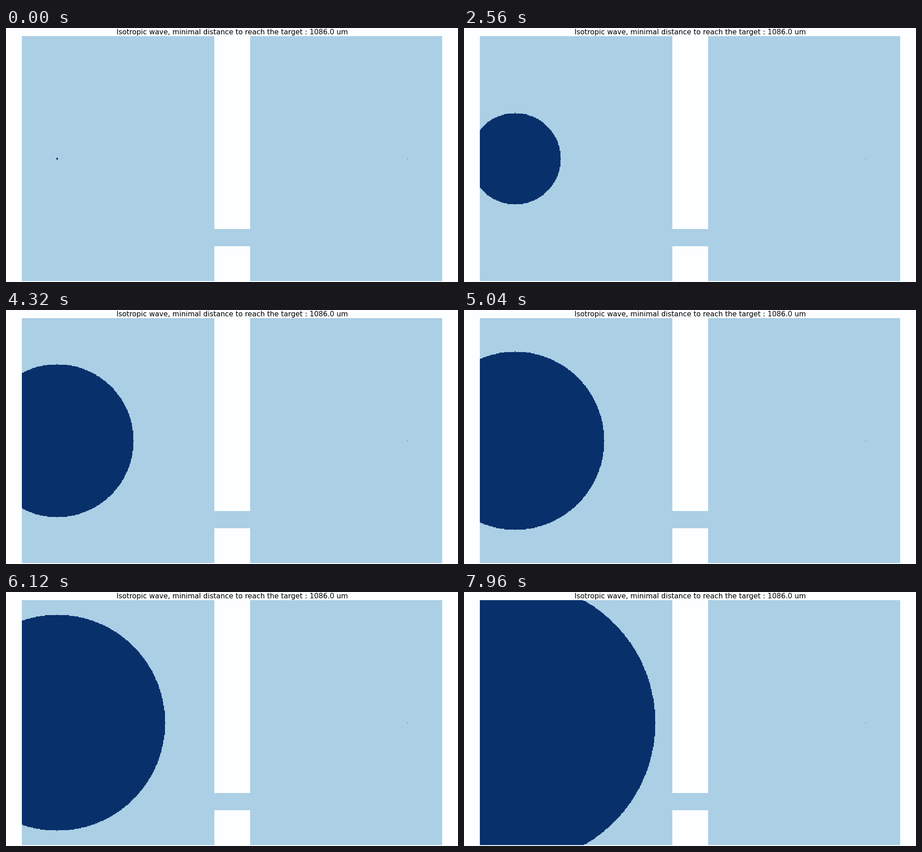
Animation of 998x561 px, one loop 8000 ms. Source, as a matplotlib script:

```python
import numpy as np
import matplotlib.pyplot as plt
from matplotlib.animation import FuncAnimation
from matplotlib.colors import ListedColormap

W, H, DPI = 998, 561, 64
COLS, ROWS = 600, 350
CELL = 928 / COLS
LEFT, TOP = 35.2, 17.7
START, GOAL = (50, 175), (550, 175)
FRAMES, INTERVAL = 200, 40

WALL, FREE, TARGET, WAVE = range(4)
PAPER = "#fcfeff"
cmap = ListedColormap([PAPER, "#abcfe5", "#3f6c98", "#08306b"])

plt.rcParams["font.family"] = "DejaVu Sans"

# Two rooms joined by a narrow corridor
room = np.full((ROWS, COLS), FREE)
room[:276, 275:326] = WALL
room[300:, 275:326] = WALL
room[GOAL[1], GOAL[0]] = TARGET

y, x = np.mgrid[:ROWS, :COLS]
dist2 = (x - START[0]) ** 2 + (y - START[1]) ** 2

fig = plt.figure(figsize=(W / DPI, H / DPI), dpi=DPI, facecolor=PAPER)
w, h = COLS * CELL, ROWS * CELL
ax = fig.add_axes([LEFT / W, 1 - (TOP + h) / H, w / W, h / H])
ax.axis("off")
picture = ax.imshow(room, cmap=cmap, vmin=WALL, vmax=WAVE,
                    interpolation="nearest", aspect="auto")
fig.text((LEFT + w / 2) / W, 1 - 14 / H,
         "Isotropic wave, minimal distance to reach the target : 1086.0 um",
         fontsize=15.68 * 72 / DPI, ha="center", va="baseline", color="black")


def update(frame):
    radius = frame + 1
    reached = (dist2 <= radius ** 2) & (room != WALL)
    picture.set_data(np.where(reached, WAVE, room))
    return [picture]


anim = FuncAnimation(fig, update, frames=FRAMES, interval=INTERVAL,
                     repeat=True, repeat_delay=0, blit=False)
plt.show()
```
